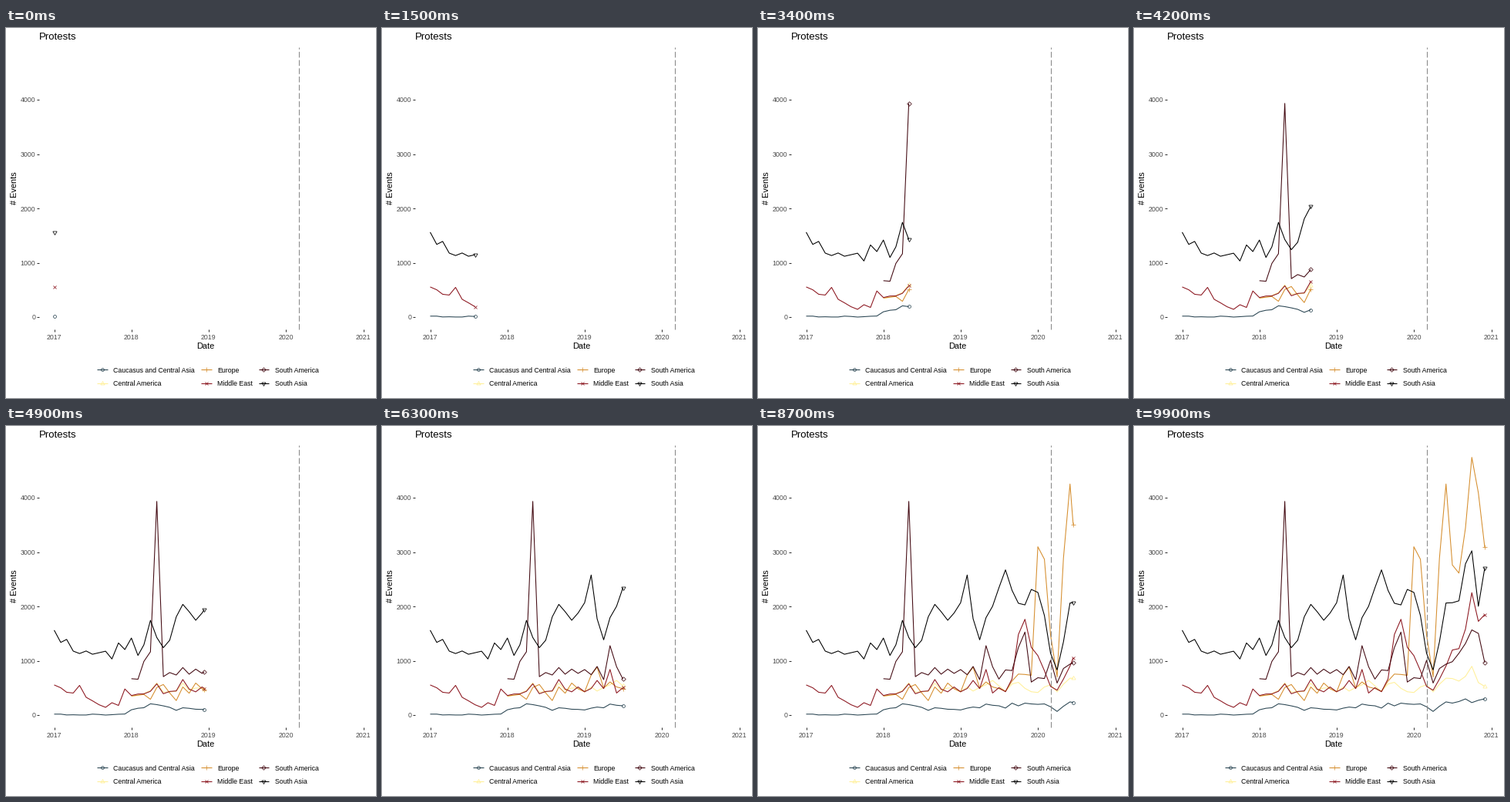
A matplotlib script for the animation above (10000 ms loop, 480 by 480 pixels).

```python
import numpy as np
import matplotlib.pyplot as plt
from matplotlib.animation import FuncAnimation

FRAMES, INTERVAL = 100, 100
plt.rcParams["font.family"] = "Liberation Sans"

# Monthly event counts; shorter series start in January 2018.
caucasus = [20, 20, 5, 8, 4, 4, 20, 14, 3, 10, 18, 22,
            100, 128, 138, 210, 195, 172, 145, 90, 137, 127, 110, 107,
            97, 130, 150, 137, 205, 183, 173, 132, 222, 172, 222, 208,
            200, 208, 155, 70, 165, 245, 223, 252, 300, 232, 275, 302]
central_america = [345, 368, 400, 455, 595, 425, 430, 440, 590, 460, 500, 500,
                   430, 520, 445, 510, 560, 640, 540, 440, 575, 605, 495, 432,
                   418, 520, 560, 430, 570, 682, 675, 628, 715, 900, 600, 530]
europe = [355, 368, 382, 293, 510, 565, 410, 270, 520, 405, 592, 487,
          430, 740, 885, 500, 612, 520, 490, 440, 630, 757, 750, 735,
          3100, 2870, 1480, 705, 2890, 4255, 2765, 2615, 3445, 4745, 4090, 3090]
middle_east = [557, 505, 422, 408, 549, 330, 265, 193, 145, 230, 180, 483,
               362, 390, 392, 440, 578, 395, 437, 447, 657, 480, 430, 520,
               432, 492, 640, 490, 842, 408, 507, 432, 670, 1485, 1765, 1250,
               1097, 820, 530, 460, 665, 905, 1200, 1225, 1585, 2255, 1727, 1852]
south_america = [672, 662, 990, 1168, 3935, 710, 785, 740, 877, 755, 848, 770,
                 840, 745, 897, 655, 1280, 893, 665, 833, 822, 1245, 1530, 610,
                 690, 675, 1010, 592, 860, 940, 985, 1140, 1320, 1570, 1505, 968]
south_asia = [1565, 1340, 1395, 1180, 1135, 1182, 1122, 1150, 1178, 1035, 1330, 1208,
              1420, 1100, 1295, 1745, 1430, 1243, 1380, 1810, 2040, 1905, 1747, 1880,
              2070, 2580, 1775, 1388, 1795, 2005, 2345, 2675, 2298, 2060, 2030, 2315,
              2260, 1835, 1140, 835, 1350, 2065, 2070, 2105, 2785, 3025, 2005, 2710]

# label, values, colour, marker, marker size
SERIES = [
    ("Caucasus and Central Asia", caucasus, "#2b4653", "o", 3.9),
    ("Central America", central_america, "#fff09a", (3, 0, 0), 6.06),
    ("Europe", europe, "#d68f30", "+", 5.5),
    ("Middle East", middle_east, "#8c1720", "x", 3.9),
    ("South America", south_america, "#430a12", "D", 3.9),
    ("South Asia", south_asia, "#000000", (3, 0, 180), 6.06),
]

START = np.datetime64("2017-01-01")
months = np.arange("2017-01", "2021-01", dtype="datetime64[M]").astype("datetime64[D]")
days = (months - START).astype(int)
keys = np.round(days / days[-1] * (FRAMES - 1))


def px(day):
    return 62.5 + 0.27447 * np.asarray(day)


def py(value):
    return 375.2 - 0.0705 * np.asarray(value)


def days_to(date):
    return int((np.datetime64(date) - START).astype(int))


# One unit is one pixel, with y pointing down.
fig = plt.figure(figsize=(480 / 72, 480 / 72), dpi=72, facecolor="white")
ax = fig.add_axes([0, 0, 1, 1])
ax.set_xlim(0, 480)
ax.set_ylim(480, 0)
ax.axis("off")


def text(x, y, s, size, color="black", ha="left", **kw):
    ax.text(x, y, s, fontsize=size, color=color, ha=ha, va="baseline", **kw)


def stroke(xs, ys, color, width=1.07, **kw):
    return ax.plot(xs, ys, color=color, lw=width, solid_capstyle="butt", **kw)[0]


def point(x, y, color, marker, size, z):
    return ax.plot(x, y, ls="none", marker=marker, ms=size, mfc="none",
                   mec=color, mew=0.75, zorder=z)[0]


text(43, 15, "Protests", 13.2)
text(258.8, 416, "Date", 11, ha="center")
ax.text(13.7, 208, "# Events", fontsize=11, rotation=90,
        rotation_mode="anchor", ha="center", va="baseline")

for year in range(2017, 2022):
    x = px(days_to(f"{year}-01-01"))
    stroke([x, x], [391.4, 394.2], "#333333")
    text(x, 404.2, str(year), 8.8, "#4d4d4d", "center")
for v in range(0, 5000, 1000):
    y = py(v)
    stroke([40.1, 42.9], [y, y], "#333333")
    text(38, y + 3.3, str(v), 8.8, "#4d4d4d", "right")

xv = px(days_to("2020-03-01"))
ax.plot([xv, xv], [391.4, 25], color="#8a8a8a", lw=1.07,
        ls=(0, (7, 3)), dash_capstyle="butt", zorder=6)

lines, points = [], []
for i, (label, values, color, marker, size) in enumerate(SERIES):
    kx, ky = (125.2, 260.2, 334.4)[i // 2], 443.2 + 17.3 * (i % 2)
    stroke([kx - 6.9, kx + 6.9], [ky, ky], color, zorder=3)
    point([kx], [ky], color, marker, size, 4)
    text(kx + 14.2, ky + 3.4, label, 8.8)
    lines.append(stroke([], [], color, zorder=3 + i / 10))
    points.append(point([], [], color, marker, size, 4 + i / 10))


def update(frame):
    for (_, values, *_), line, dot in zip(SERIES, lines, points):
        n = len(values)
        k, d, v = keys[-n:], days[-n:], np.array(values)
        if frame < k[0]:
            line.set_data([], [])
            dot.set_data([], [])
            continue
        x, y = px(np.interp(frame, k, d)), py(np.interp(frame, k, v))
        past = k <= frame
        line.set_data(np.append(px(d[past]), x), np.append(py(v[past]), y))
        dot.set_data([x], [y])
    return lines + points


anim = FuncAnimation(fig, update, frames=FRAMES, interval=INTERVAL,
                     init_func=lambda: update(0), repeat=True, repeat_delay=0)
plt.show()
```
